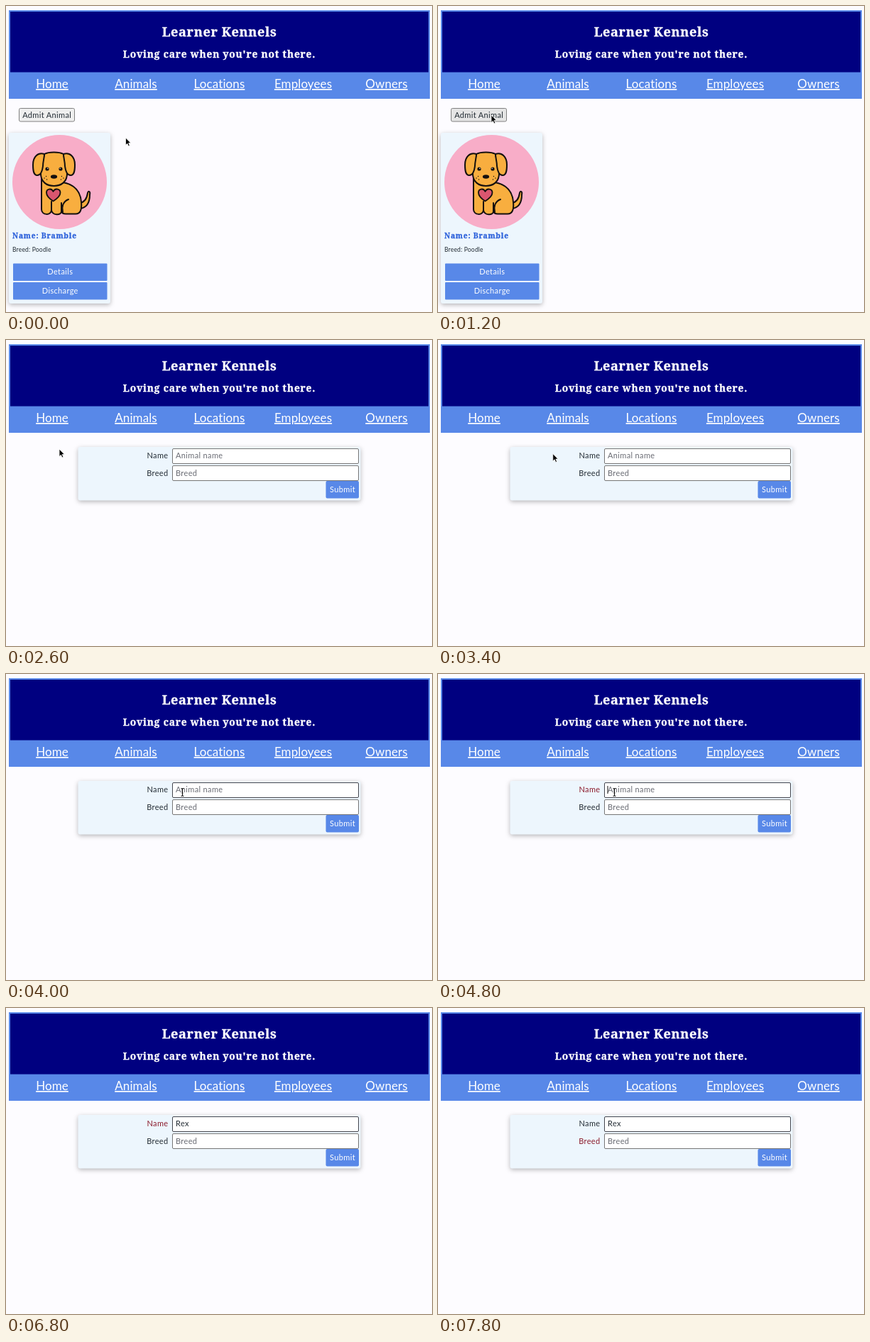
These frames come from a looping animation (600 by 432 pixels, 8000 ms). An HTML page:

```html
<!DOCTYPE html>
<html lang="en">
<head>
<meta charset="utf-8">
<title>Kennel admissions</title>
<style>
  html, body { margin: 0; width: 100%; height: 100%; overflow: hidden; background: #fdfcff; }
  svg { display: block; width: 600px; height: 432px; }
  text { font: 11px Lato, sans-serif; letter-spacing: .35px; fill: #222b33; }
  .slab { font-family: "Noto Serif", serif; font-weight: 900; fill: #fff; stroke: #fff; stroke-width: .35; }
  .title { font-size: 18.2px; letter-spacing: .6px; }
  .tagline { font-size: 13.8px; letter-spacing: .8px; }
  .pet { font-size: 10.2px; letter-spacing: .85px; fill: #2f63db; stroke: #2f63db; }
  .breed { font-size: 8.5px; letter-spacing: .2px; }
  .nav text { font-size: 17px; letter-spacing: .1px; fill: #fff; text-decoration: underline; text-decoration-thickness: 1px; }
  .mid { text-anchor: middle; }
  .end { text-anchor: end; }
  .light { fill: #fff; }
  .blue { fill: #5888e8; }
  .panel { fill: #edf6fd; filter: drop-shadow(0 2px 3px rgba(0, 0, 0, .28)); }
  .field { fill: #fff; stroke: #767676; }
  .dog { fill: #f8ae3f; stroke: #14100f; stroke-width: 2; stroke-linecap: round; stroke-linejoin: round; }
  .ink { fill: #14100f; stroke: none; }
  .line { fill: none; }
</style>
</head>
<body>
<svg viewBox="0 0 600 432">
  <rect class="blue" x="4" y="6" width="593" height="125"/>
  <rect x="6" y="8" width="589" height="85.5" fill="#000080"/>
  <text class="slab title mid" x="300.5" y="43">Learner Kennels</text>
  <text class="slab tagline mid" x="300.5" y="72.5">Loving care when you're not there.</text>
  <g class="nav mid">
    <text x="65" y="116">Home</text>
    <text x="183" y="116">Animals</text>
    <text x="300.5" y="116">Locations</text>
    <text x="418.5" y="116">Employees</text>
    <text x="536" y="116">Owners</text>
  </g>

  <g id="list">
    <rect id="admit" x="18.5" y="144.5" width="78" height="18.5" rx="2" stroke="#808080"/>
    <text class="mid" x="57.7" y="157.5">Admit Animal</text>
    <rect class="panel" x="4" y="179" width="143" height="241" rx="3"/>
    <circle cx="75.5" cy="248.5" r="66.5" fill="#f8adc8"/>
    <g class="dog">
      <path d="M104 278C111 277 114 271 115 264C116 260 119 262 118 266C118 278 113 285 104 286Z"/>
      <path d="M50 244V287C50 296 64 296 64 288C65 296 78 296 78 290Q79 293.5 84 293.5H98C105 293.5 107 287 106 277C105 261 96 252 80 249Z"/>
      <path class="line" d="M64 288V276M78 290V278M80 291C78 284 80 276 88 273"/>
      <path d="M49 234C48 249 58 254 67.5 254C77 254 87 249 86 234L81 209C75 205.5 60 205.5 54 209Z"/>
      <path id="ear" d="M54 209C45 206 38 213 38 224C38 233 39 239 44 239C49 239 51 234 52 226C52 219 54 215 54 209Z"/>
      <use href="#ear" transform="matrix(-1 0 0 1 135 0)"/>
      <g id="cheek">
        <circle class="ink" cx="58" cy="230" r="2.6"/>
        <circle cx="58.8" cy="229.2" r=".7" fill="#fff" stroke="none"/>
        <path class="line" stroke-width="1.3" d="M54 243h.1M56.5 240.500h.1M57.500 245h.1"/>
      </g>
      <use href="#cheek" transform="matrix(-1 0 0 1 135 0)"/>
      <ellipse class="ink" cx="67.5" cy="241" rx="4.6" ry="2.800"/>
      <path fill="#d9566f" stroke-width="1.8" d="M66.5 275.500C61 272 57 268 57 263.500C57 258 64 256.500 66.500 262C69 256.500 76.500 258 76.500 263.500C76.500 268 72 272 66.500 275.500Z"/>
    </g>
    <text class="slab pet" x="9" y="327.5">Name: Bramble</text>
    <text class="breed" x="9" y="347">Breed: Poodle</text>
    <rect class="blue" x="10" y="363.5" width="132.5" height="24.5" rx="1"/>
    <rect class="blue" x="10" y="390" width="132.5" height="24.5" rx="1"/>
    <text class="light mid" x="76.3" y="379">Details</text>
    <text class="light mid" x="76.3" y="405.5">Discharge</text>
  </g>

  <g id="form">
    <rect class="panel" x="101.5" y="151" width="398" height="75.5" rx="3"/>
    <text id="nameLabel" class="end" x="228.5" y="167">Name</text>
    <text id="breedLabel" class="end" x="228.5" y="191.5">Breed</text>
    <rect id="nameField" class="field" x="234.5" y="153.5" width="262" height="21" rx="1.5"/>
    <rect class="field" x="234.5" y="177.5" width="262" height="21" rx="1.5"/>
    <text id="nameText" x="239" y="167"></text>
    <text x="239" y="191.5" style="fill:#696b73">Breed</text>
    <rect class="blue" x="450.5" y="199" width="46.5" height="24.5" rx="2"/>
    <text class="light mid" x="474" y="215">Submit</text>
    <rect id="caret" width="1" height="11" fill="#111"/>
  </g>

  <path id="arrow" d="M0 0V10.5L2.4 8.3L4 12L5.8 11.2L4.2 7.6H7.4Z" fill="#000" stroke="#fff" stroke-width=".8"/>
  <path id="beam" d="M-2-5.5Q0-5.5 0-4Q0-5.5 2-5.5M0-4V4M-2 5.5Q0 5.5 0 4Q0 5.5 2 5.5M-1 1H1" fill="none" stroke="#111" stroke-width="1.1"/>
</svg>
<script>
const LOOP = 8000, TICK = 200;
const PATH = [[200, 168.5, 186], [1000, 75, 154], [3000, 75, 154], [3800, 248.5, 167]];
const TYPED = [[0, ""], [5400, "R"], [5600, "Re"], [6000, "Rex"]];
const HOVER = 800, PRESS = 2400, OPEN = 2600, FOCUS = 4600, TAB = 7200;

const [list, form, admit, nameLabel, breedLabel, nameField, nameText, caret, arrow, beam] =
  ["list", "form", "admit", "nameLabel", "breedLabel", "nameField", "nameText", "caret", "arrow", "beam"]
    .map(id => document.getElementById(id));

const show = (el, on) => { el.style.display = on ? "" : "none"; };
const ease = p => p * p * (3 - 2 * p);

function pointer(t) {
  const next = PATH.findIndex(point => point[0] > t);
  if (next === 0) return PATH[0].slice(1);
  if (next < 0) return PATH.at(-1).slice(1);
  const [t0, x0, y0] = PATH[next - 1], [t1, x1, y1] = PATH[next];
  const p = ease((t - t0) / (t1 - t0));
  return [x0 + (x1 - x0) * p, y0 + (y1 - y0) * p];
}

function draw(t) {
  const [typedAt, typed] = TYPED.findLast(step => step[0] <= t);
  const [x, y] = pointer(t);
  const overField = t >= OPEN && x > 234 && y > 153;
  const onName = t >= FOCUS && t < TAB, onBreed = t >= TAB;

  show(list, t < OPEN);
  show(form, t >= OPEN);
  admit.style.fill = t >= PRESS ? "#f5f5f5" : t >= HOVER ? "#e5e5e5" : "#efefef";

  nameLabel.style.fill = onName ? "#8b1a2b" : "";
  breedLabel.style.fill = onBreed ? "#8b1a2b" : "";
  nameField.style.stroke = overField ? "#44464f" : "";
  nameText.textContent = typed || "Animal name";
  nameText.style.fill = typed ? "" : "#696b73";

  const since = t - (onBreed ? TAB : Math.max(FOCUS, typedAt));
  show(caret, (onName || onBreed) && since % 1000 < 500);
  caret.setAttribute("x", onName && typed ? 239 + nameText.getComputedTextLength() : 238.5);
  caret.setAttribute("y", onBreed ? 182.5 : 158);

  show(arrow, !overField);
  show(beam, overField && !typed);
  for (const el of [arrow, beam]) el.setAttribute("transform", `translate(${x} ${y})`);
}

const start = performance.now();
function frame() {
  const t = (performance.now() - start) % LOOP;
  draw(Math.floor(t / TICK) * TICK);
  requestAnimationFrame(frame);
}
frame();
</script>
</body>
</html>
```
